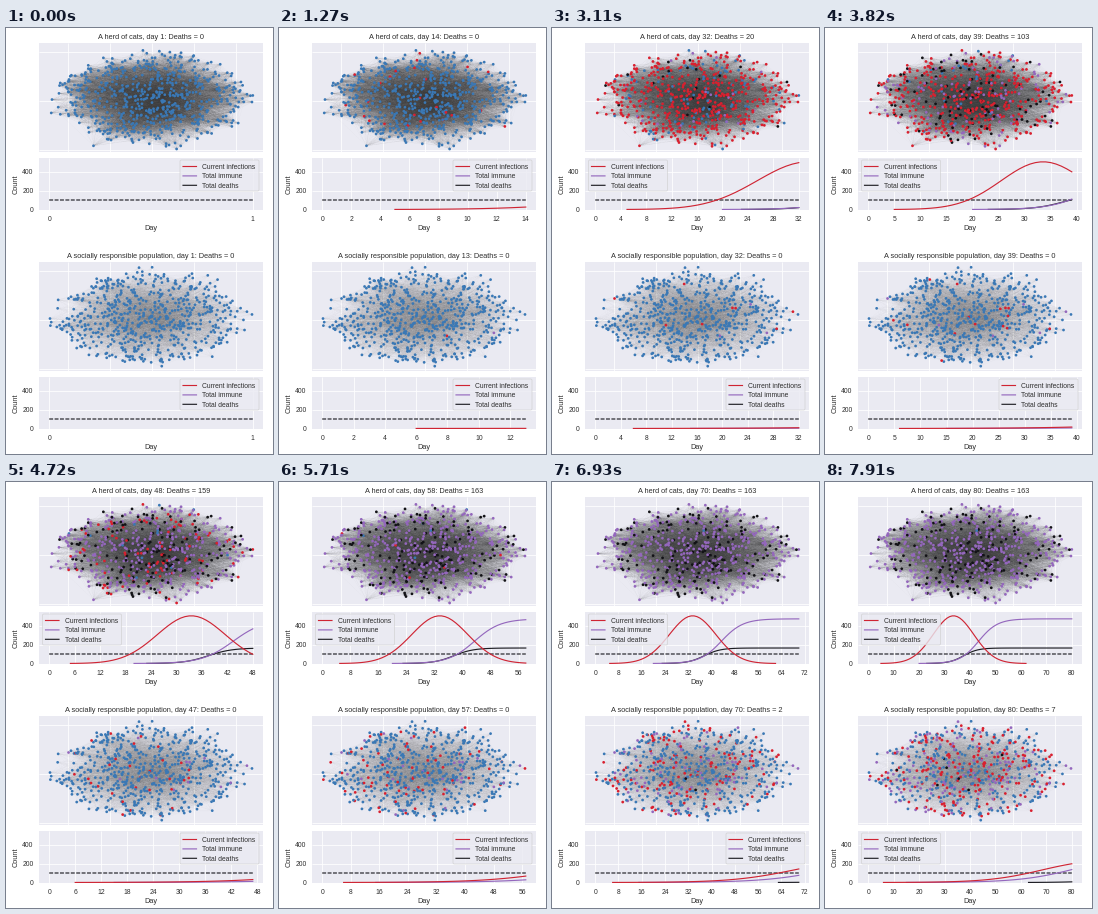
A matplotlib script for the animation above (8000 ms loop, 267 px wide and 426 px high).

```python
import numpy as np
import matplotlib.pyplot as plt
from matplotlib.animation import FuncAnimation
from matplotlib.collections import LineCollection
from matplotlib.colors import to_rgba_array
from matplotlib.patches import FancyBboxPatch, Rectangle
from matplotlib.ticker import MaxNLocator

W, H = 267, 426
DAYS, N = 80, 634
STEP, LOOP = 20, 8000
LEFT, RIGHT = 33, 257
X0, X1 = 43.2, 246.8
UNIT = 19 / 200            # pixels per counted person
INK, PANEL = "#2e2e2e", "#EAEAF2"
RED, PURPLE, BLACK = "#cf2433", "#9467bd", "#1c1c22"
STATE_COLORS = to_rgba_array(["#3a78b5", "#d9202f", "#9467bd", "#121216"])
DAY = np.arange(DAYS + 1)

plt.rcParams["font.family"] = "Liberation Sans"
fig = plt.figure(figsize=(W / 72, H / 72), dpi=72, facecolor="white")
ax = fig.add_axes([0, 0, 1, 1])
ax.axis("off")


def bell(peak, mid, width):
    return peak * np.exp(-((DAY - mid) / width) ** 2 / 2)


def logistic(limit, mid, width):
    return limit / (1 + np.exp((mid - DAY) / width))


def node_states(infected, immune, dead, rng):
    """State of each node per day: 0 healthy, 1 infected, 2 immune, 3 dead."""
    inf, imm, ded = (np.rint(s).astype(int) for s in (infected, immune, dead))
    total = np.minimum(np.maximum.accumulate(inf + imm + ded), N)
    order = rng.permutation(N)
    state = np.zeros(N, int)
    out, done = [], 0
    for d in DAY:
        fresh = order[:total[d]]
        state[fresh[state[fresh] == 0]] = 1
        for kind, count in ((3, ded), (2, imm)):
            new = count[d] - (count[d - 1] if d else 0)
            state[order[done:done + new]] = kind
            done += new
        out.append(state.copy())
    return out


def layout(rng, cx, cy):
    r = 0.93 * rng.random(N) ** 0.62 + rng.normal(0, 0.055, N)
    a = rng.uniform(0, 2 * np.pi, N)
    x, y = r * np.cos(a), r * np.sin(a)
    x[:2], y[:2] = (-1, 1), (0.03, -0.05)
    return np.clip(cx + 101 * x, X0, X1), np.clip(cy + 51 * y, cy - 51, cy + 51)


def edge_image(rng, x, y, top, count, depth, shade):
    """Soft picture of many faint straight links between random nodes."""
    i, j = rng.integers(N, size=(2, count))
    t = np.linspace(0, 1, 150)[:, None]
    px, py = x[i] + t * (x[j] - x[i]), y[i] + t * (y[j] - y[i])
    weight = np.broadcast_to(np.hypot(x[j] - x[i], y[j] - y[i]), px.shape)
    dens = np.histogram2d(py.ravel(), px.ravel(), bins=(109, RIGHT - LEFT),
                          range=((top, top + 109), (LEFT, RIGHT)),
                          weights=weight.ravel())[0]
    img = np.full(dens.shape + (4,), shade)
    img[..., 3] = 1 - np.exp(-depth * dens / np.percentile(dens, 99))
    return img


def text(x, y, s="", size=6.8, ha="center", **kw):
    kw.setdefault("va", "baseline")
    return ax.text(x, y, s, size=size, ha=ha, color=INK, **kw)


def line(x, y, color, **kw):
    return ax.plot(x, y, color=color, lw=1.15, snap=False, **kw)[0]


def panel(top, height):
    box = Rectangle((LEFT, top), RIGHT - LEFT, height, fc=PANEL, ec="none", zorder=0)
    return ax.add_patch(box)


def grid(xs, ys, top, bottom):
    return ([[(x, top), (x, bottom)] for x in xs]
            + [[(LEFT, y), (RIGHT, y)] for y in ys])


def add_grid(segments):
    lines = LineCollection(segments, colors="white", lw=0.8, zorder=1)
    return ax.add_collection(lines)


def legend(x, top):
    """Draw the key at x and return its artists."""
    parts = [ax.add_patch(FancyBboxPatch(
        (x, top + 2), 77, 29, boxstyle="round,pad=1,rounding_size=1.4",
        fc=PANEL, ec="#cccccc", lw=0.7, alpha=0.8, zorder=6))]
    rows = (("Current infections", RED), ("Total immune", PURPLE), ("Total deaths", BLACK))
    for k, (name, color) in enumerate(rows):
        y = top + 7.5 + 9.4 * k
        parts.append(line([x + 2, x + 15.5], [y, y], color, zorder=7))
        parts.append(text(x + 21.5, y + 2.4, name, ha="left", zorder=7))
    return parts


class Scenario:
    def __init__(self, name, dy, seed, center, edges, infected, immune, dead):
        rng = np.random.default_rng(seed)
        self.name, self.infected, self.dead = name, infected, dead
        self.states = node_states(infected, immune, dead, rng)

        # network
        top = 15 + dy
        net = panel(top, 109)
        self.title = text(145, dy + 10.6, size=7.4)
        add_grid(grid(62 + 42 * np.arange(5), dy + 23.5 + 49 * np.arange(3), top, top + 109))
        x, y = layout(rng, *center)
        ax.imshow(edge_image(rng, x, y, top, *edges), aspect="auto", zorder=2,
                  extent=(LEFT, RIGHT, top + 109, top), interpolation="nearest")
        self.nodes = ax.scatter(x, y, s=7.5, linewidths=0, zorder=3)
        self.nodes.set_clip_path(net)

        # counts
        self.top, self.base = 130 + dy, 182 + dy
        plot = panel(self.top, 52)
        for v in (0, 200, 400):
            text(27.5, self.level(v) + 2.4, str(v), ha="right")
        text(10, self.base - 26, "Count", 7.4, rotation=90, va="center")
        text(145, self.base + 19.6, "Day", 7.4)
        self.grid = add_grid([])
        self.ticks = [text(0, self.base + 11) for _ in range(13)]
        y100 = self.level(100)
        line([X0, X1], [y100, y100], BLACK, dashes=(3.4, 1.3), zorder=3)
        self.curves = []
        for data, color, z in ((infected, RED, 5), (immune, PURPLE, 4.9), (dead, BLACK, 4.8)):
            curve = line([], [], color, zorder=z)
            curve.set_clip_path(plot)
            self.curves.append((curve, data))
        self.keys = {"left": legend(37.5, self.top + 1), "right": legend(175, self.top + 1)}

    def level(self, v):
        return self.base - 0.5 - UNIT * v

    def show(self, day):
        self.title.set_text(f"{self.name}, day {day}: Deaths = {round(self.dead[day])}")
        self.nodes.set_facecolors(STATE_COLORS[self.states[day]])

        # the key moves left once the curve would run into it
        side = "left" if self.infected[day] > 185 or self.dead[day] > 20 else "right"
        for place, parts in self.keys.items():
            for part in parts:
                part.set_visible(place == side)

        scale = (X1 - X0) / day
        lo, hi = -0.05 * day, 1.05 * day
        marks = [v for v in MaxNLocator(integer=True).tick_values(lo, hi) if lo <= v <= hi]
        self.grid.set_segments(grid([X0 + v * scale for v in marks],
                                    [self.level(v) for v in (200, 400)],
                                    self.top, self.base))
        for label in self.ticks:
            label.set_visible(False)
        for label, v in zip(self.ticks, marks):
            label.set(visible=True, x=X0 + v * scale, text=f"{v:.0f}")

        xs = X0 + DAY[:day + 1] * scale
        for curve, data in self.curves:
            seen = data[:day + 1]
            curve.set_data(xs, np.where(seen > 0.7, self.level(seen), np.nan))


herd = Scenario("A herd of cats", 0, 4, (147, 70), (18000, 2.5, 0.18),
                infected=bell(502, 33.5, 8), immune=logistic(470, 43.4, 3.7),
                dead=logistic(163, 37.49, 2.8))
careful = Scenario("A socially responsible population", 219, 9, (145, 289),
                   (9000, 0.85, 0.25),
                   infected=logistic(260, 68, 10.5), immune=logistic(300, 82.1, 11.1),
                   dead=logistic(30, 88.5, 7))

ax.set_xlim(0, W)
ax.set_ylim(H, 0)

# The lower population sometimes refreshes slightly after the upper one.
turn = np.arange(1, DAYS)
herd_times = 100 * turn - 30 * (turn % 5 == 3)
careful_times = herd_times + 50 * np.isin(turn % 5, (2, 3))


def update(i):
    t = i * STEP + STEP / 2
    herd.show(1 + int(np.sum(herd_times <= t)))
    careful.show(1 + int(np.sum(careful_times <= t)))


anim = FuncAnimation(fig, update, frames=LOOP // STEP, interval=STEP,
                     repeat=True, repeat_delay=0, blit=False)
plt.show()
```
